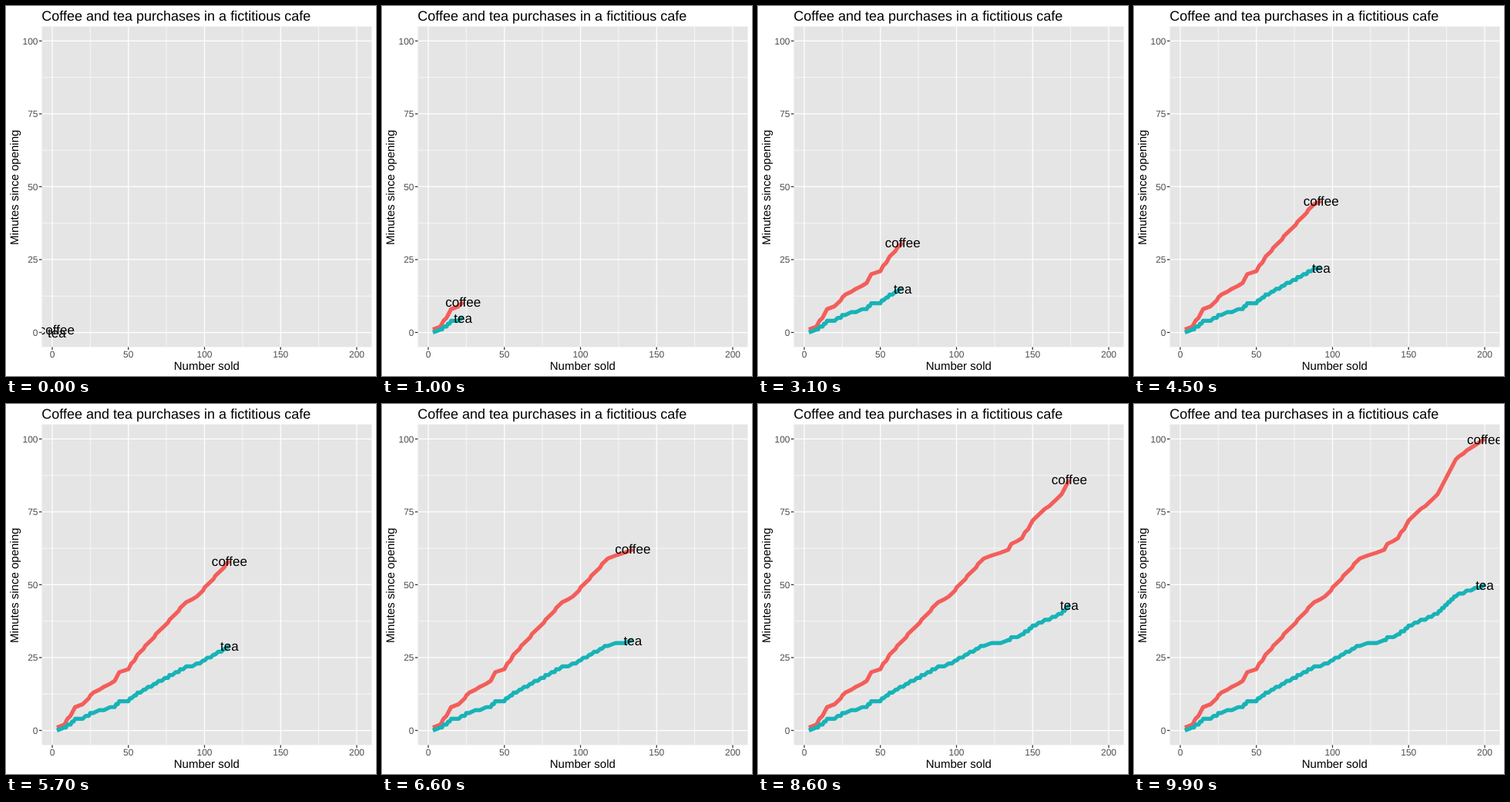
Animation of 480 by 480 pixels, one loop 10000 ms. Source, as an HTML page:

```html
<!DOCTYPE html>
<html lang="en">
<head>
<meta charset="utf-8">
<title>Coffee and tea purchases</title>
<style>
  html, body { margin: 0; width: 100%; height: 100%; overflow: hidden; background: #fff; }
  svg {
    display: block; width: 100vw; height: 100vh;
    font-family: "Liberation Sans", Arial, sans-serif;
    text-rendering: geometricPrecision;
  }
  .tick { font-size: 12px; fill: #4d4d4d; }
  .axis { font-size: 15px; }
  .label { font-size: 17.07px; text-anchor: middle; }
  .series { fill: none; stroke-width: 5.2; stroke-linejoin: round; }
</style>
</head>
<body>
<svg viewBox="0 0 480 480">
  <clipPath id="panel"><rect x="46.5" y="26.5" width="428" height="415.9"/></clipPath>
  <rect width="480" height="480" fill="#fff"/>
  <rect x="46.5" y="26.5" width="428" height="415.9" fill="#e5e5e5"/>
  <g id="grid"></g>
  <g id="plot" clip-path="url(#panel)"></g>
  <text x="46.3" y="19.3" font-size="18">Coffee and tea purchases in a fictitious cafe</text>
  <text class="axis" x="260.3" y="472" text-anchor="middle">Number sold</text>
  <text class="axis" transform="translate(16.3 235.3) rotate(-90)" text-anchor="middle">Minutes since opening</text>
</svg>
<script>
const LEFT = 46.5, RIGHT = 474.5, TOP = 26.5, BOTTOM = 442.4;
const FRAMES = 100, STEP = 100, MAJOR = 1.25, MINOR = 0.65;
const FIRST = 3, LAST = 200;
const px = x => 60 + x * 1.975;
const py = y => 423.5 - y * 3.781;

function add(parent, tag, attrs, text = "") {
  const el = document.createElementNS("http://www.w3.org/2000/svg", tag);
  for (const key in attrs) el.setAttribute(key, attrs[key]);
  el.textContent = text;
  return parent.appendChild(el);
}

const grid = document.getElementById("grid");
const plot = document.getElementById("plot");

function line(x1, y1, x2, y2, stroke, width) {
  add(grid, "line", { x1, y1, x2, y2, stroke, "stroke-width": width });
}
const vertical = (x, width) => line(px(x), TOP, px(x), BOTTOM, "#fff", width);
const horizontal = (y, width) => line(LEFT, py(y), RIGHT, py(y), "#fff", width);

for (let i = 0; i < 4; i++) {
  vertical(25 + 50 * i, MINOR);
  horizontal(12.5 + 25 * i, MINOR);
}
for (let i = 0; i < 5; i++) {
  const x = 50 * i, y = 25 * i;
  vertical(x, MAJOR);
  horizontal(y, MAJOR);
  line(px(x), BOTTOM, px(x), BOTTOM + 3.5, "#333", MAJOR);
  line(LEFT - 3.5, py(y), LEFT, py(y), "#333", MAJOR);
  add(grid, "text", { class: "tick", x: px(x), y: 456, "text-anchor": "middle" }, x);
  add(grid, "text", { class: "tick", x: 41.5, y: py(y) + 4.3, "text-anchor": "end" }, y);
}

function interpolate(points, x) {
  const i = Math.max(1, points.findIndex(p => p[0] >= x - 1e-9));
  const [x0, y0] = points[i - 1], [x1, y1] = points[i];
  return y0 + (y1 - y0) * (x - x0) / (x1 - x0);
}

// [coffee count, position] where the pace of coffee sales changes.
const bends = [
  [1, 3], [2, 8], [8, 15], [9, 20], [13, 27], [17, 41], [20, 44],
  [21, 50], [26, 56], [44, 88], [46, 95], [59, 118], [62, 134], [64, 136],
  [66, 143], [72, 150], [81, 169], [93, 181], [96, 188], [100, 200]
];

// Tea gains one for every second coffee.
const series = [
  { name: "coffee", color: "#f35e5a", value: n => n },
  { name: "tea", color: "#17b3b7", value: n => Math.floor(n / 2) }
];
for (const s of series) {
  s.points = Array.from({ length: 100 }, (_, i) =>
    [Math.round(interpolate(bends, i + 1)), s.value(i + 1)]);
  s.path = add(plot, "path", { class: "series", stroke: s.color });
}
for (const s of series) s.label = add(plot, "text", { class: "label" }, s.name);

function render(time) {
  const frame = Math.floor(time / STEP) % FRAMES;
  const x = FIRST + (LAST - FIRST) * frame / (FRAMES - 1);
  const end = Math.max(x, FIRST + 1);
  for (const s of series) {
    const shown = s.points.filter(p => p[0] < end);
    shown.push([end, interpolate(s.points, end)]);
    s.path.setAttribute("d", "M" + shown.map(p => px(p[0]).toFixed(2) + " " + py(p[1]).toFixed(2)).join("L"));
    s.label.setAttribute("x", px(x));
    s.label.setAttribute("y", py(interpolate(s.points, x)) + 6.4);
  }
}

const start = performance.now();
function tick() {
  render(performance.now() - start);
  requestAnimationFrame(tick);
}
tick();
</script>
</body>
</html>
```
